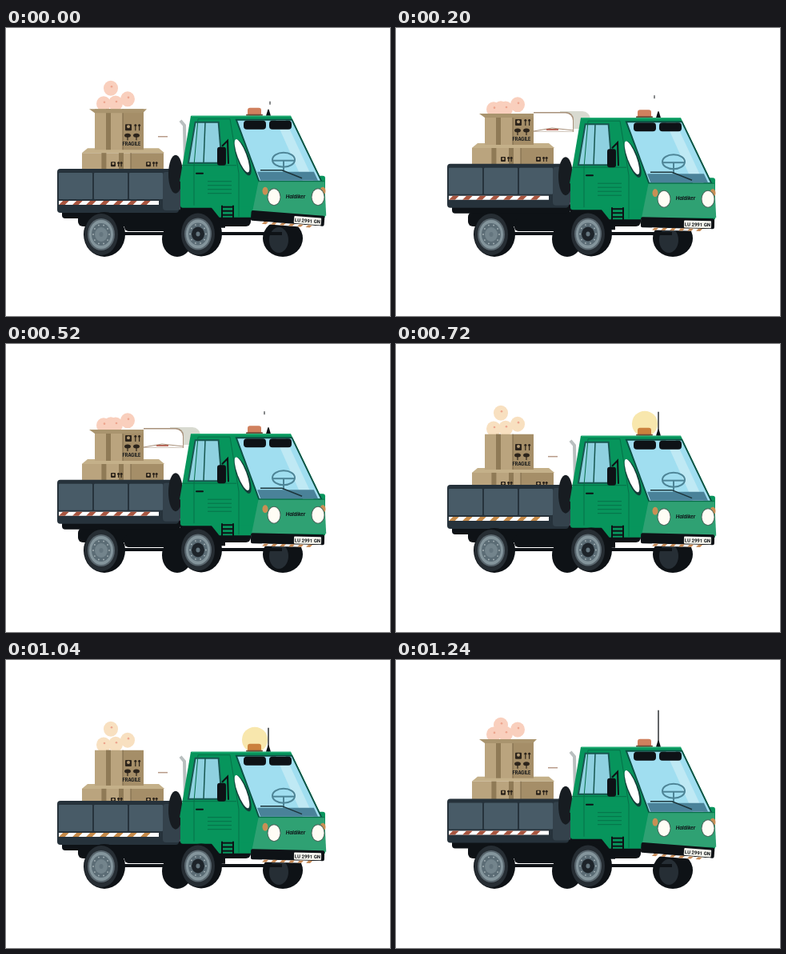
Animation, 480 px wide and 360 px high, one loop 1.28 s. Source, as an HTML page with a canvas:

```html
<!DOCTYPE html>
<html lang="en">
<head>
<meta charset="utf-8">
<title>Bouncing truck</title>
<style>
html, body { margin: 0; width: 100%; height: 100%; overflow: hidden; background: #fff; }
canvas { display: block; }
</style>
</head>
<body>
<canvas id="stage" width="480" height="360"></canvas>
<script>
const g = document.getElementById('stage').getContext('2d');
const PERIOD = 320, STEP = 40, TAU = Math.PI * 2;
const GREEN = '#07955c', SHADE = '#067048', NOSE = '#2fa173', BLACK = '#0e1216', GLASS = '#a0def0';

// Sloping edges of the cab, x as a function of depth below the roof
const edge = (x, slope = 0) => y => x + slope * y;
const rear = edge(231, -.17), pillar = edge(285, .37), front = edge(356, .48), doorFront = edge(272, .08);
const between = (a, b, k) => y => a(y) + (b(y) - a(y)) * k;

function rect(fill, x, y, w, h, r = 0) {
  g.beginPath();
  g.roundRect(x, y, w, h, r);
  g.fillStyle = fill;
  g.fill();
}

function oval(fill, x, y, rx, ry = rx, angle = 0) {
  g.beginPath();
  g.ellipse(x, y, rx, ry, angle, 0, TAU);
  g.fillStyle = fill;
  g.fill();
}

function line(color, width, ...p) {
  g.beginPath();
  for (let i = 0; i < p.length; i += 2) g.lineTo(p[i], p[i + 1]);
  g.strokeStyle = color;
  g.lineWidth = width;
  g.stroke();
}

// Area between two edges over a range of depth
function band(fill, top, bottom, left, right, inset = 0) {
  g.beginPath();
  g.moveTo(left(top) + inset, top);
  g.lineTo(right(top) - inset, top);
  g.lineTo(right(bottom) - inset, bottom);
  g.lineTo(left(bottom) + inset, bottom);
  g.fillStyle = fill;
  g.fill();
}

function text(str, x, y, font) {
  g.font = font;
  g.textAlign = 'center';
  g.fillStyle = BLACK;
  g.fillText(str, x, y);
}

function at(x, y, draw, angle = 0) {
  g.save();
  g.translate(x, y);
  g.rotate(angle);
  draw();
  g.restore();
}

function hazard(x, y, w, h, gap, color) {
  rect('#fff', x, y, w, h);
  for (let i = x; i < x + w - gap; i += gap)
    band(color, y, y + h, edge(i + gap * .3 + y, -1), edge(i + gap * .75 + y, -1));
}

function wheel(x, y, hub) {
  oval(BLACK, x + 4, y, 26, 28);
  oval('#262d33', x, y, 21, 26);
  oval('#59666e', x, y, 17, 20);
  oval('#84959c', x, y, 15, 18);
  oval('#5b6c75', x, y, 12, 14);
  for (let a = 0; a < TAU; a += TAU / 10)
    oval('#aab6ba', x + 10 * Math.cos(a), y + 12 * Math.sin(a), .9);
  oval(hub, x, y, 8, 9);
  oval('#64757e', x, y, 2.5, 3);
}

function ball(x, y, color) {
  oval(color, x, y, 9, 9.5);
  oval('#eda58e', x + 1, y - 2, 1.3);
}

function careMarks(x, y, size) {
  rect('#2c241b', x, y, size, size, 1);
  oval('#b49b74', x + size / 2, y + size * .4, size / 4);
  for (const k of [1.6, 2.2]) {
    line('#2c241b', 1.2, x + size * k, y, x + size * k, y + size);
    oval('#2c241b', x + size * k, y + 1.5, 1.6, 1.2);
  }
}

function box(x, y, split, w, h) {
  rect('#baa47e', x, y, split, h);
  rect('#8f7a56', x + split * .4, y, 6, h);
  rect('#a58e68', x + split, y, w - split, h);
  line('#7b6748', 1, x + split, y, x + split, y + h);
}

function topBox(flaps, h) {
  box(0, 0, 35, 61, h);
  if (flaps) band('#a9946e', 0, 5, edge(-7, 1.4), edge(65, -1));
  careMarks(38, h - 32, 8);
  for (const x of [41, 52]) {
    oval('#2c241b', x, h - 18, 4, 2.5);
    line('#2c241b', 1.2, x, h - 18, x, h - 12);
  }
  text('FRAGILE', 46, h - 5, 'bold 5.5px Inter, sans-serif');
}

function lowerBoxes() {
  band('#c4b089', 0, 6, edge(7, -1.2), edge(96, 1.2));
  box(0, 6, 61, 102, 38);
  rect('#8f7a56', 46, 6, 6, 38);
  careMarks(36, 17, 6);
  careMarks(80, 17, 6);
}

function bed(stripe) {
  rect(BLACK, 6, 48, 148, 14, 4);
  rect('#26323b', 0, 0, 152, 55, 4);
  rect('#34424c', 132, 4, 22, 48, 4);
  for (let i = 0; i < 3; i++) rect('#485b67', 2 + i * 44, 5, 42, 33, 1);
  hazard(2, 40, 125, 5, 17, stripe);
}

function exhaust(puffing, lit, y) {
  if (puffing) {
    rect('#d8dad0', 205, 104, 38, 22, [0, 10, 0, 0]);
    rect('#a8917b', 172, 105, 50, 25, [0, 9, 0, 0]);
    rect('#fff', 172, 106.5, 49, 23, [0, 9, 0, 0]);
    line('#a8917b', 1, 172, 129, 195, 125, 222, 128);
    line('#b96b5d', 2, 188, 127, 203, 127);
    return;
  }
  line('#b79a88', 1.5, 190, y + 20, 202, y + 20);
  line('#b9bfbf', 4, 218, y, 223, y + 6, 224, y + 55);
}

function beacon(lit) {
  if (lit) oval('#f8e7ad', 311, -15, 16);
  rect(lit ? '#cb813d' : '#d0805e', 302, -10, 17, 10, 3);
  rect('#6b4a38', 300, -2, 21, 2, 1);
}

function antenna(phase, lit) {
  const tall = phase >= 240 ? 46 : lit ? 30 : 0;
  const [x, y] = phase ? [323, -28] : [330, -18];
  if (tall) line(BLACK, 1.3, 328, -tall, 328, 0);
  else line(BLACK, 1, x, y, x, y + 4);
  band(BLACK, -8, 0, edge(325, -.3), edge(331, .3));
}

function door() {
  band('#17564f', 7, 60, rear, doorFront, 6);
  band('#8fd1e0', 9, 58, rear, doorFront, 8);
  line('#17564f', 1.5, 249, 8, 247, 59);
  line(SHADE, 1, 235, 112, 235, 62, 240, 4, 280, 4, 291, 72, 291, 126);
  line(SHADE, 1, 220, 62, 288, 62);
  rect(BLACK, 237, 71, 10, 2, 1);
  for (let y = 82; y < 102; y += 5) line(SHADE, 1, 252, y, 282, y);
  line(BLACK, 2, 270, 38, 277, 31, 278, 60);
  rect(BLACK, 264, 39, 11, 23, 3);
}

function windscreen() {
  band('#0b5143', 4, 82, pillar, front);
  band(GLASS, 6, 81, pillar, front, 2);
  band('#bfe9f4', 6, 81, between(pillar, front, .7), between(pillar, front, .87));
  band('#4a8299', 70, 81, between(pillar, front, .04), between(pillar, front, .94));
  for (const x of [297, 329]) rect(BLACK, x, 6, 28, 11, 4);
  g.beginPath();
  g.ellipse(347, 55, 14, 9, 0, 0, TAU);
  g.strokeStyle = '#4d8496';
  g.lineWidth = 2;
  g.stroke();
  line('#4d8496', 2, 334, 56, 361, 56);
  line('#4d8496', 2, 347, 56, 347, 70);
  line('#1c343a', 1.5, 318, 68, 345, 68, 370, 78);
}

function nose() {
  band(NOSE, 82, 125, edge(332, -.2), edge(394, .05));
  line(SHADE, 1, 315, 82, 398, 82);
  for (const [x, signal] of [[335, 324], [390, 396]]) {
    oval('#c98f55', signal, 94, 3.5, 5);
    oval('#4c665b', x, 101.5, 8.5, 11);
    oval('#fffdf5', x, 101.5, 7.5, 10);
  }
  text('Haldiker', 362, 103, 'italic bold 6px Inter, sans-serif');
}

function cab() {
  rect(BLACK, 218, 105, 56, 35);
  band(GREEN, 0, 82, rear, front);
  rect(GREEN, 218, 75, 181, 40, 3);
  band(GREEN, 114, 127, edge(165, .8), edge(399));
  line('#2cb67d', 1, 232, .5, 356, .5);
  door();
  oval('#123d38', 296, 52, 7, 24, -.36);
  oval('#fff', 295, 50, 5.5, 22, -.36);
  windscreen();
  nose();
  for (const x of [270, 284]) line(BLACK, 2, x, 112, x, 131);
  for (let y = 114; y <= 130; y += 5) line(BLACK, 2, 269, y, 285, y);
}

function bumper() {
  rect(BLACK, -72, -7, 92, 13, 2);
  hazard(-58, 6, 74, 3, 11, '#c58955');
  rect('#f6f6ef', -18, -4, 34, 9, 1);
  text('LU 2991 GN', -1, 3, 'bold 6px Roboto, sans-serif');
}

function chassis() {
  oval(BLACK, 214, 264, 19, 22);
  oval(BLACK, 346, 263, 25, 23);
  oval('#262e35', 341, 265, 12, 16);
  rect(BLACK, 90, 230, 216, 18, 6);
  rect(BLACK, 148, 238, 80, 16, 5);
  line(BLACK, 4, 145, 257, 345, 257);
}

function draw(now) {
  const phase = Math.floor(now / STEP) * STEP % PERIOD;
  const wave = (mean, amp, peak) => mean + amp * Math.cos((phase - peak) / PERIOD * TAU);
  const lit = phase >= 40 && phase < 160;
  const puffing = phase >= 160 && phase < 260;
  const cabY = wave(112.2, 3.5, 120);
  const ballY = wave(97.5, 8, 125);
  const lowerY = wave(149, 6, 70);
  const topY = wave(107, 8, 120);
  const skin = lit ? '#f8e0c0' : '#f9cfbd';

  rect('#fff', 0, 0, 480, 360);
  chassis();

  ball(131, wave(89, 14, 170), skin);
  for (let i = 0; i < 3; i++) ball(122 + i * 15, ballY + 4 * Math.sin(1 + i * 1.4), skin);
  at(95, lowerY, lowerBoxes);
  at(111, topY, () => topBox(!lit, lowerY + 2 - topY));

  exhaust(puffing, lit, cabY + 6);
  at(64, wave(173.5, 3.7, 40), () => bed(lit ? '#c58a49' : '#a8553f'));
  oval('#171c21', 212, cabY + 73, 9, 24);

  at(0, cabY, () => {
    beacon(lit);
    antenna(phase, lit);
    cab();
  });
  const tilt = Math.max(0, wave(2.2, 2.4, -20)) * Math.PI / 180;
  at(378, wave(243.5, 3.5, 140), bumper, tilt);

  wheel(119, 258, '#73848c');
  wheel(240, 257.5, '#1d242a');
}

function tick() {
  draw(performance.now());
  requestAnimationFrame(tick);
}
tick();
</script>
</body>
</html>
```
